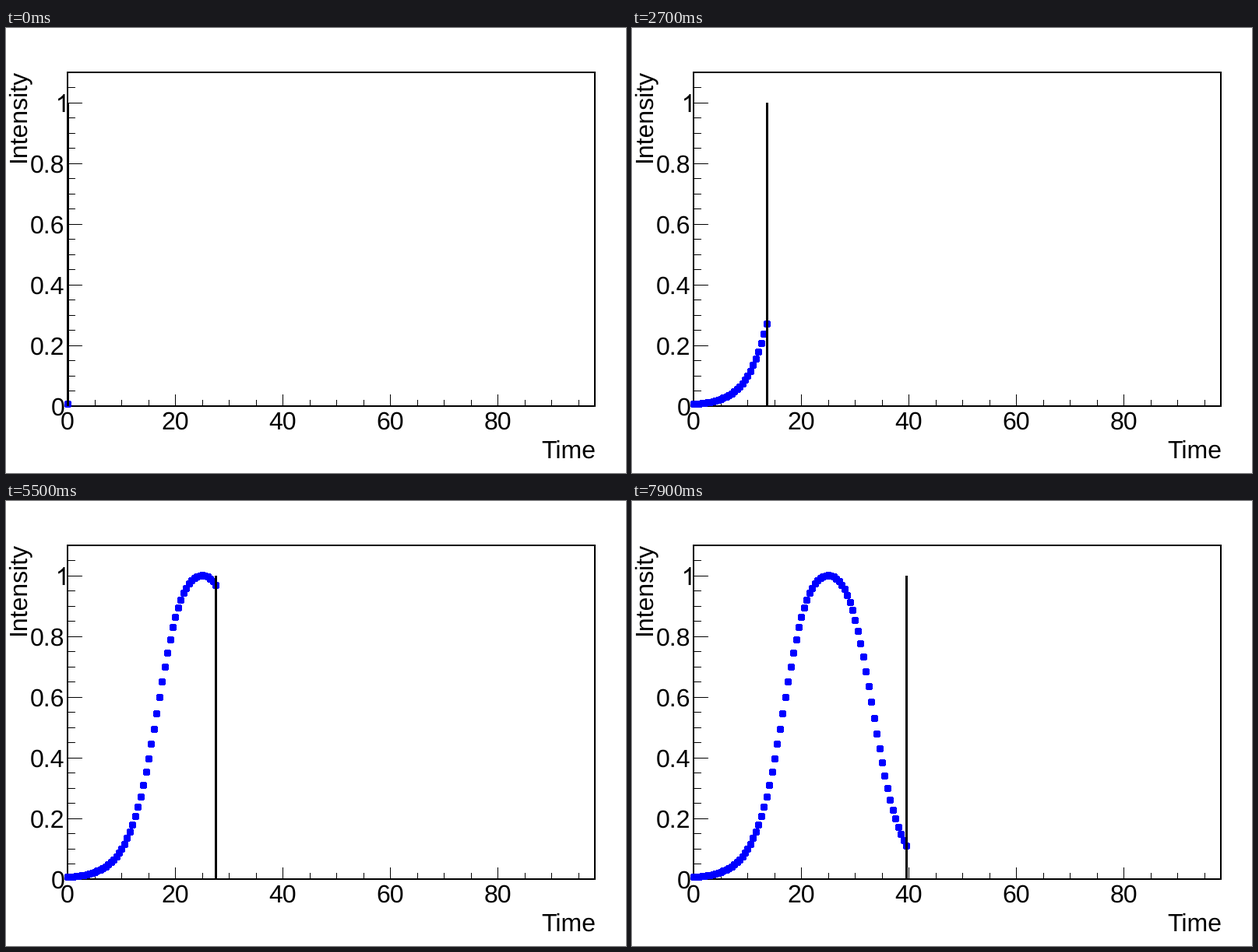
A matplotlib script for the animation above (8000 ms loop, 796x572 px).

```python
import numpy as np
import matplotlib.pyplot as plt
from matplotlib.animation import FuncAnimation
from matplotlib.patches import Circle, PathPatch, Rectangle
from matplotlib.path import Path

W, H, DPI = 796, 572, 100
STEPS, INTERVAL = 80, 100
FONT_PX = 32
LEFT, RIGHT, TOP, BOTTOM = 78, 757, 56, 487
X0, Y0 = 79.6, 486.2        # stage position of the data origin
X_UNIT, Y_UNIT = 6.9, 390   # pixels per unit of time and intensity
PEAK, HALF_WIDTH = 49.85, 17.73

plt.rcParams.update({
    "font.family": "Liberation Sans",
    "text.hinting": "none",
})
fig = plt.figure(figsize=(W / DPI, H / DPI), dpi=DPI, facecolor="white")
ax = fig.add_axes([0, 0, 1, 1])
ax.set_xlim(0, W)
ax.set_ylim(H, 0)
ax.axis("off")


def box(x0, y0, x1, y1, z=1):
    rect = Rectangle((x0, y0), x1 - x0, y1 - y0, fc="black", lw=0, zorder=z)
    return ax.add_patch(rect)


def label(x, y, text, **kw):
    ax.text(x, y, text, fontsize=FONT_PX * 72 / DPI, color="black",
            va="baseline", zorder=2, **kw)


def footless_one(right, base):
    """Digit one without a foot, its stem ending at the given right edge."""
    stem, top = 2.8, 23
    pts = [(0, 0), (-stem, 0), (-stem, -18), (-5, -15.6), (-8.4, -14.5),
           (-8.4, -17.2), (-3.6, -19.5), (-1.8, -top), (0, -top), (0, 0)]
    codes = [Path.MOVETO, Path.LINETO, Path.LINETO, Path.CURVE3, Path.CURVE3,
             Path.LINETO, Path.CURVE3, Path.CURVE3, Path.LINETO,
             Path.CLOSEPOLY]
    shape = Path(np.array(pts) + (right, base), codes)
    ax.add_patch(PathPatch(shape, fc="black", lw=0, zorder=2))


def cursor_left(i):
    return int(78.97 + X_UNIT / 2 * i)


def intensity(i):
    """Symmetric pulse: flat top, logistic flanks, near-exponential tails."""
    d = abs(i - PEAK)
    steep = 1.6 * np.log(d / HALF_WIDTH) + 0.114 * (d - HALF_WIDTH)
    return 1 / (1 + np.exp(steep))


# Frame
box(LEFT, TOP, RIGHT, TOP + 2)
box(LEFT, BOTTOM - 2, RIGHT, BOTTOM)
box(LEFT, TOP, LEFT + 2, BOTTOM)
box(RIGHT - 2, TOP, RIGHT, BOTTOM)

# Time axis
for t in range(0, 100, 5):
    x = int(X0 + X_UNIT * t)
    major = t % 20 == 0
    box(x, 471 if major else 478, x + 1, BOTTOM - 1)
    if major:
        label(x, 516, str(t), ha="center")

# Intensity axis
for k in range(22):
    y = int(Y0 - Y_UNIT * k / 20)
    major = k % 4 == 0
    box(LEFT, y, 98 if major else 89, y + 1)
    if k == 20:
        footless_one(75.5, y + 12)
    elif major:
        label(75.5, y + 12, f"{k / 20:g}", ha="right")

label(757, 553, "Time", ha="right")
label(24, 54, "Intensity", rotation=90, ha="right", rotation_mode="anchor")

dots = []
for i in range(STEPS):
    y = round(Y0 - Y_UNIT * intensity(i)) - 0.5
    dot = Circle((cursor_left(i) + 1.5, y), 4.5, fc="#0000ff", lw=0,
                 antialiased=False, zorder=3)
    dots.append(ax.add_patch(dot))
cursor = box(78, 96, 81, 486, z=4)


def update(i):
    for k, dot in enumerate(dots):
        dot.set_visible(k <= i)
    cursor.set_x(cursor_left(i))
    return [*dots, cursor]


anim = FuncAnimation(fig, update, frames=STEPS, interval=INTERVAL,
                     repeat=True, repeat_delay=0, blit=False)
plt.show()
```
